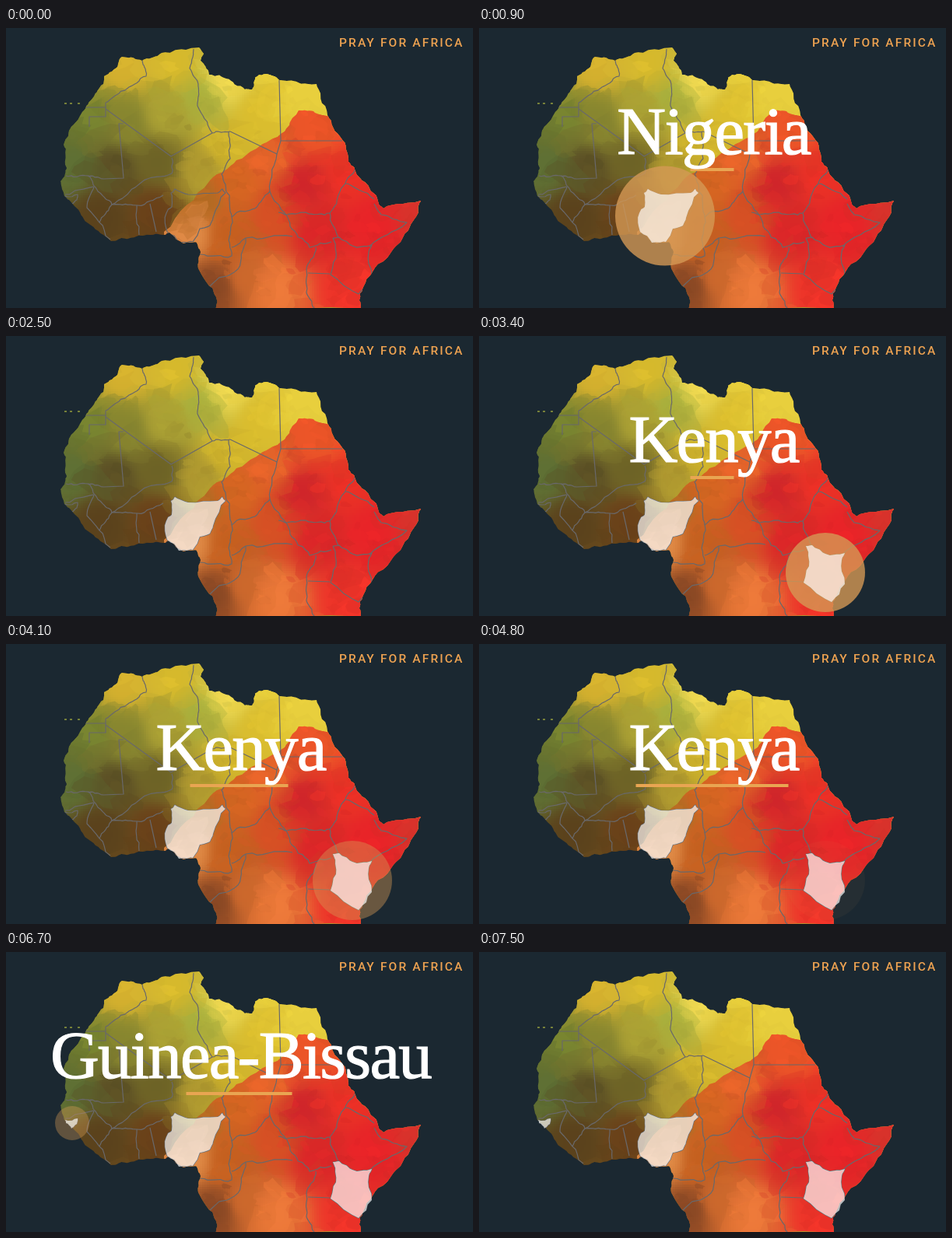
Animation, 600 px wide and 360 px high, one loop 8 s. Source, as an HTML page with a canvas:

```html
<!DOCTYPE html>
<html lang="en">
<head>
<meta charset="utf-8">
<title>Pray for Africa</title>
<style>
  html, body { margin: 0; width: 100%; height: 100%; overflow: hidden; background: #1b2831; }
  canvas, svg { position: absolute; left: 0; top: 0; width: 600px; height: 360px; }
  .heading { font: 500 15.5px Roboto, sans-serif; letter-spacing: 2.16px; fill: #eda251; }
  .name { font: 87px "Liberation Serif", serif; letter-spacing: -1.8px; text-anchor: middle;
          fill: #fff; stroke: #fff; stroke-width: 1.2px; }
</style>
</head>
<body>
<canvas id="map" width="600" height="360"></canvas>
<svg viewBox="0 0 600 360">
  <circle id="pulse" fill="#d59a55"/>
  <g id="countries" fill="#fff" fill-opacity=".68"></g>
  <rect id="rule" y="180" height="4" fill="#e9a552"/>
  <text id="name" class="name" x="301.5" y="161.8"></text>
  <text class="heading" x="428" y="24">PRAY FOR AFRICA</text>
</svg>
<script>
const LOOP = 8000, TICK = 100, SHOW = 2000, FIRST = 500, EVERY = 2500;

const stops = [
  { name: 'Nigeria', cx: 239, cy: 241.5, r: 64,
    shape: '207,262 206,238 213,230 212,212 217,207 234,214 272,212 278,207 282,212 266,244 262,254 249,258 240,275 222,276' },
  { name: 'Kenya', cx: 445, cy: 304, r: 51,
    shape: '420,270 428,269 445,280 470,279 466,288 470,319 453,342 417,317 424,296' },
  { name: 'Guinea-Bissau', cx: 85, cy: 220, r: 22,
    shape: '76,216 92,214 91,221 84,227 77,220' }
];

const coast =
  '149,37 175,42 200,32 248,25 254,33 250,42 261,60 283,65 307,79 316,79 320,64 333,59 351,67 399,72 413,112 ' +
  '433,145 440,172 452,190 477,219 485,232 533,222 530,237 507,275 470,315 455,341 457,362 ' +
  '270,362 270,346 247,309 250,288 245,276 228,277 210,263 185,266 148,270 135,274 104,250 88,229 75,216 ' +
  '70,197 78,180 74,150 98,108 113,88 125,72 126,62 143,50 149,37';

const straightBorders = '102,102 128,102|128,96 128,114 107,114 107,127|128,104 212,165 265,135|' +
  '151,123 145,123 151,193 125,194|288,133 348,162 353,145 351,67|353,145 432,145|388,315 416,316|185,226 193,262';

const windingBorders = '175,42 180,62 158,76 128,96|125,194 105,190 77,190|105,190 118,210 136,227|' +
  '136,227 172,200 213,187 213,167|241,27 236,52 247,75 246,100 265,135 288,133|' +
  '286,134 288,168 277,188 287,215 290,243|290,243 320,232 339,210 348,162|339,210 365,255 390,282 418,275|' +
  '290,243 287,268 290,293 249,291|290,282 308,270 368,268|308,270 298,310 262,332|' +
  '449,178 436,200 473,220|436,200 416,238 427,270|350,237 385,237 416,238|473,226 482,240 515,250 467,281|' +
  '398,282 386,310 386,340 397,362|76,214 113,204|113,204 104,231 134,272|120,250 136,227 168,228 171,266|168,228 202,215';

// The warm south begins along this edge.
const warmEdge = '412,113 395,107 376,106 349,140 296,170 262,196 203,262 203,362 545,362 545,113';

// Key tones of the two washes: x y colour
const northTones = '150 50 d4b02e,215 45 d6b92c,250 85 a6ae3c,275 72 efd850,380 85 e8cf3d,325 110 dabd2e,' +
  '285 150 d2b52c,250 185 b09a30,205 110 aaa034,105 115 74802f,150 120 84832f,85 175 5f7034,' +
  '135 180 5c5025,195 170 6d6326,120 240 5b421c,190 235 6a4119';
const southTones = '235 262 e08a46,250 220 b26a22,295 200 d66522,340 165 e3642a,400 130 ec5528,378 200 d0252a,' +
  '440 190 ea3026,470 250 e82428,525 232 d8322b,400 260 da2628,345 240 d65024,285 265 c5601f,' +
  '270 330 8a4824,305 320 cc682c,345 335 ee7a3a,440 335 ee3329';

let seed = 20;
const random = () => (seed = (seed * 16807) % 2147483647) / 2147483647;
const spread = n => (random() * 2 - 1) * n;
const points = text => text.split(' ').map(p => p.split(',').map(Number));
const lines = text => text.split('|').map(points);
const ctx = document.getElementById('map').getContext('2d');

// Fractal line: every pass adds a jittered midpoint to each segment.
function roughen(list, passes = 3) {
  if (!passes) return list;
  const finer = list.flatMap((p, i) => {
    const q = list[i + 1];
    if (!q) return [p];
    const n = Math.min(2.2, Math.hypot(q[0] - p[0], q[1] - p[1]) * 0.13);
    return [p, [(p[0] + q[0]) / 2 + spread(n), (p[1] + q[1]) / 2 + spread(n)]];
  });
  return roughen(finer, passes - 1);
}

function trace(list) {
  ctx.beginPath();
  list.forEach(p => ctx.lineTo(...p));
}

function toneField(text) {
  const tones = text.split(',').map(entry => {
    const [x, y, hex] = entry.split(' ');
    return { x: +x, y: +y, rgb: hex.match(/../g).map(h => parseInt(h, 16)) };
  });
  return (x, y, gain = 1) => {
    const sum = [0, 0, 0];
    let total = 0;
    for (const t of tones) {
      const w = 1 / ((t.x - x) ** 2 + (t.y - y) ** 2 + 150) ** 2;
      total += w;
      t.rgb.forEach((v, i) => { sum[i] += v * w; });
    }
    return `rgb(${sum.map(v => Math.min(255, Math.round(v / total * gain)))})`;
  };
}

// Smooth ground colour with overlapping translucent washes.
function paint(tones, washes) {
  const colour = toneField(tones);
  for (let y = 20; y < 360; y += 3)
    for (let x = 66; x < 540; x += 3) {
      ctx.fillStyle = colour(x, y);
      ctx.fillRect(x, y, 3, 3);
    }
  ctx.globalAlpha = 0.42;
  for (let i = 0; i < washes; i++) {
    const x = 66 + random() * 474, y = 20 + random() * 340;
    const size = 5 + 17 * random() ** 2, tilt = spread(1), blob = [];
    for (let a = 0; a < 6.28; a += 0.6) {
      const r = size * (0.6 + 0.6 * random()), u = Math.cos(a) * r * 1.4, v = Math.sin(a) * r * 0.8;
      blob.push([x + u * Math.cos(tilt) - v * Math.sin(tilt), y + u * Math.sin(tilt) + v * Math.cos(tilt)]);
    }
    ctx.fillStyle = colour(x + spread(16), y + spread(16), 1 + spread(0.08));
    trace(blob);
    ctx.fill();
  }
  ctx.globalAlpha = 1;
}

function drawMap() {
  ctx.save();
  trace(roughen(points(coast)));
  ctx.clip();
  paint(northTones, 420);
  ctx.save();
  trace(roughen(points(warmEdge)));
  ctx.clip();
  paint(southTones, 420);
  ctx.restore();

  ctx.strokeStyle = '#69686a';
  ctx.lineWidth = 1.2;
  ctx.lineJoin = 'round';
  const winding = lines(windingBorders).map(line => roughen(line));
  for (const line of [...lines(straightBorders), ...winding, ...stops.map(s => s.outline)]) {
    trace(line);
    ctx.stroke();
  }
  ctx.restore();

  ctx.fillStyle = '#77813a';
  for (const x of [75, 82, 92]) ctx.fillRect(x, 96, 3, 2);
}

const [pulse, countries, rule, label] = ['pulse', 'countries', 'rule', 'name'].map(id => document.getElementById(id));
const set = (el, attrs) => Object.entries(attrs).forEach(([k, v]) => el.setAttribute(k, v));
const show = (el, on) => { el.style.display = on ? '' : 'none'; };

stops.forEach((stop, i) => {
  const corners = points(stop.shape);
  stop.start = FIRST + i * EVERY;
  stop.outline = roughen([...corners, corners[0]], 2);
  stop.el = document.createElementNS('http://www.w3.org/2000/svg', 'polygon');
  stop.el.setAttribute('points', stop.outline.join(' '));
  countries.append(stop.el);
});

function render(now) {
  const time = Math.floor(now % LOOP / TICK) * TICK;
  for (const s of stops) show(s.el, time >= s.start);

  const stop = stops.find(s => time >= s.start && time < s.start + SHOW);
  for (const el of [pulse, rule, label]) show(el, stop);
  if (!stop) return;

  const age = time - stop.start, half = 8 + age / 20;
  set(pulse, { cx: stop.cx, cy: stop.cy, r: stop.r, opacity: 1 - age / (SHOW - TICK) });
  set(rule, { x: 299.5 - half, width: half * 2 });
  if (label.textContent !== stop.name) label.textContent = stop.name;
}

function loop() {
  render(performance.now());
  requestAnimationFrame(loop);
}

drawMap();
loop();
</script>
</body>
</html>
```
